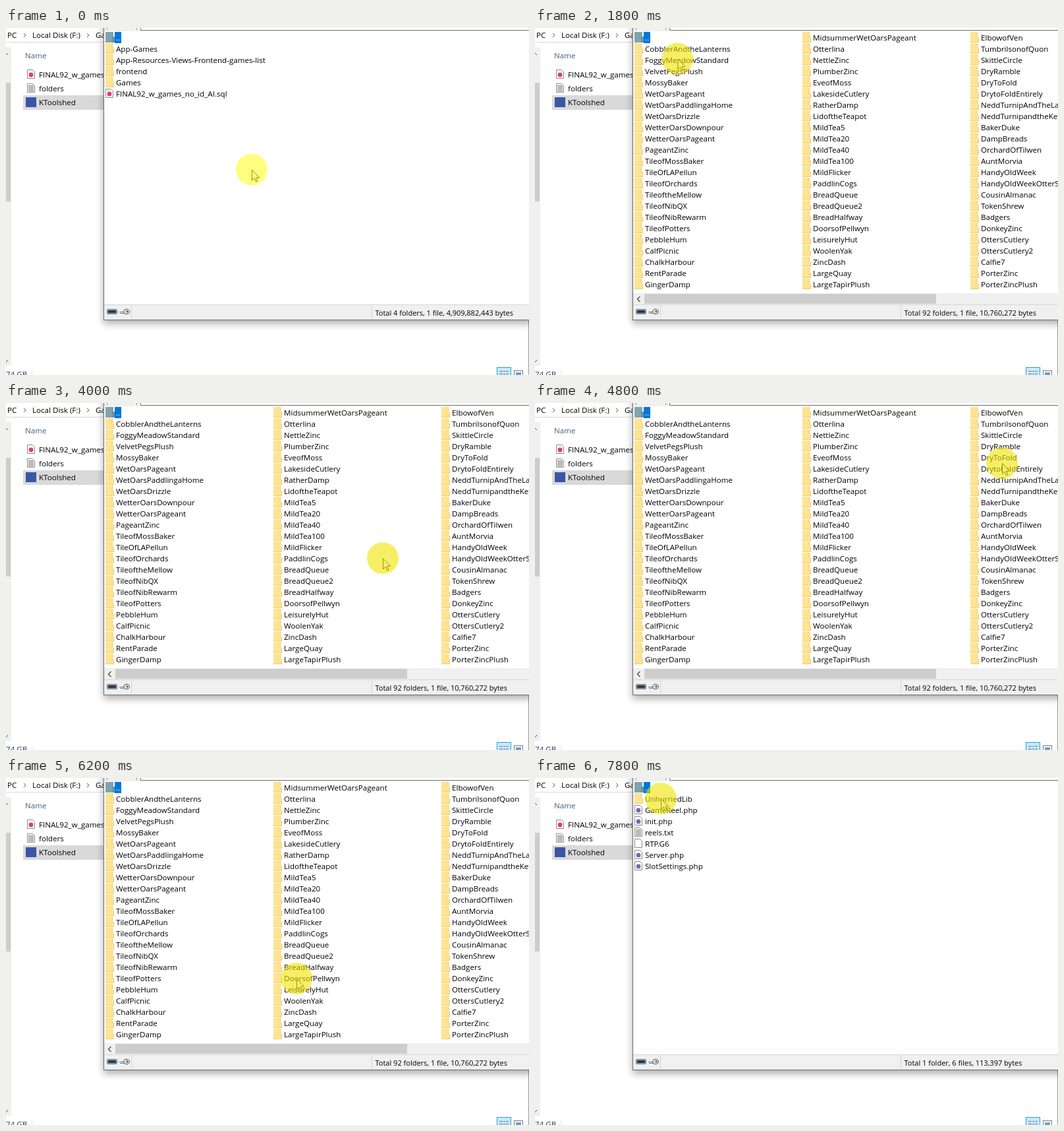
Recreate the animation shown at these times as an HTML page. Size 794 by 526 pixels, loop 8000 ms.

```html
<!DOCTYPE html>
<html lang="en">
<head>
<meta charset="utf-8">
<title>Archive browsing</title>
<style>
  html, body { margin: 0; width: 100%; height: 100%; overflow: hidden; background: #fff; }
  svg { display: block; width: 794px; height: 526px; }
  text { font: 11.6px "Open Sans", "Noto Sans", sans-serif; fill: #000; white-space: pre; }
  .status { font-size: 11px; }
  .line { fill: none; stroke: #555; }
  .panel { filter: drop-shadow(0 5px 6px #0005); }
</style>
</head>
<body>
<svg viewBox="0 0 794 526">
  <g id="explorer"></g>
  <g id="archive"></g>
  <g id="list"></g>
  <g id="pointer">
    <path d="M.5 .5V16.5L4.2 13L6.6 18.6L9 17.6L6.6 12.2H11.6Z" fill="#fff" stroke="#222"/>
    <circle id="halo" r="24"/>
    <g id="rings" fill="none" stroke="#f4ea3c" opacity=".85">
      <circle r="33.5" stroke-width="3"/>
      <circle r="27.5" stroke-width="2.5"/>
    </g>
  </g>
</svg>
<script>
const $ = id => document.getElementById(id);
const words = s => s.trim().split(/\s+/);

const rect = (x, y, w, h, fill, extra = '') =>
  `<rect x="${x}" y="${y}" width="${w}" height="${h}" fill="${fill}" ${extra}/>`;
const text = (x, y, s, extra = '') => `<text x="${x}" y="${y}" ${extra}>${s}</text>`;
const line = (d, extra = '') => `<path class="line" d="${d}" ${extra}/>`;
const dot = (x, y, r, fill) => `<circle cx="${x}" cy="${y}" r="${r}" fill="${fill}"/>`;

const page = (x, y) =>
  `<path d="M${x + .5} ${y + .5}h8l3 3v10h-11z" fill="#fff" stroke="#8a8a8a"/>`;
const lined = (x, y) => page(x, y) +
  line([4, 6, 8, 10, 12].map(d => `M${x + 2} ${y + d - .5}h8`).join(''), 'style="stroke:#777"');
const folder = (x, y, on) => on
  ? rect(x, y - 1, 12, 16, '#7fa3ad') + rect(x + 10, y + 6, 4, 9, '#6594ac')
  : rect(x, y - 1, 11, 16, '#ffe391') + rect(x + 10, y + 7, 3, 8, '#ffe391') +
    line(`M${x} ${y + 14.5}h13M${x + 10.5} ${y - 1}v8M${x + 12.5} ${y + 7}v8`, 'style="stroke:#ecca72"');

function icon(name, x, y, on) {
  const ext = (name.match(/\w\.(\w+)$/) || [])[1];
  if (!ext) return folder(x, y, on);
  if (ext === 'txt') return lined(x, y);
  const mark = { sql: '#e23e5c', php: '#8064ae' }[ext];
  return page(x, y) + (mark ? dot(x + 6, y + 8, 3.4, mark) : '');
}

const screens = [
  {
    items: words('.. App-Games App-Resources-Views-Frontend-games-list frontend Games FINAL92_w_games_no_id_AI.sql'),
    total: 'Total 4 folders, 1 file, 4,909,882,443 bytes'
  },
  {
    items: words(`..
      CobblerAndtheLanterns FoggyMeadowStandard VelvetPegsPlush MossyBaker WetOarsPageant
      WetOarsPaddlingaHome WetOarsDrizzle WetterOarsDownpour WetterOarsPageant PageantZinc
      TileofMossBaker TileOfLAPellun TileofOrchards TileoftheMellow TileofNibQX TileofNibRewarm
      TileofPotters PebbleHum CalfPicnic ChalkHarbour RentParade GingerDamp
      MidsummerWetOarsPageant Otterlina NettleZinc PlumberZinc EveofMoss LakesideCutlery
      RatherDamp LidoftheTeapot MildTea5 MildTea20 MildTea40 MildTea100 MildFlicker PaddlinCogs
      BreadQueue BreadQueue2 BreadHalfway DoorsofPellwyn LeisurelyHut WoolenYak ZincDash
      LargeQuay LargeTapirPlush
      ElbowofVen TumbrilsonofQuon SkittleCircle DryRamble DryToFold DrytoFoldEntirely
      NeddTurnipAndTheLadder NeddTurnipandtheKettle BakerDuke DampBreads OrchardOfTilwen
      AuntMorvia HandyOldWeek HandyOldWeekOtterShelf CousinAlmanac TokenShrew Badgers
      DonkeyZinc OttersCutlery OttersCutlery2 Calfie7 PorterZinc PorterZincPlush`),
    total: 'Total 92 folders, 1 file, 10,760,272 bytes',
    scroll: true
  },
  {
    items: words('.. UnhurriedLib GameReel.php init.php reels.txt RTP.G6 Server.php SlotSettings.php'),
    total: 'Total 1 folder, 6 files, 113,397 bytes'
  }
];

function drawList({ items, total, scroll }, chosen, width) {
  let out = items.map((name, i) => {
    const x = 151 + 255 * Math.floor(i / 23), y = 17 * (i % 23), on = i === chosen;
    return (on ? rect(x + 14, y + 6, width, 17, '#0078d7') : '') +
      icon(name, x, y + 7, on) +
      text(x + 16, y + 19, name, on ? 'style="fill:#fff"' : '');
  }).join('');
  if (scroll) out += rect(149, 402, 645, 17, '#f0f0f0') + rect(166, 403, 443, 15, '#cdcdcd') +
    line('M159.5 407l-4 4l4 4', 'stroke-width="1.5"');
  return out + text(560.5, 436, total, 'class="status"');
}

$('explorer').innerHTML =
  text(2, 15, 'PC') + text(40, 15, 'Local Disk (F:)') + text(136, 15, 'Games') +
  line('M27 8l3 3l-3 3M123 8l3 3l-3 3') +
  rect(0, 21, 149, 1, '#d9d9d9') +
  rect(0, 29, 8, 483, '#f0f0f0') + rect(0, 83, 7, 180, '#cdcdcd') +
  line('M-2 41l2-3l3 3M-2 503l2 4l3-4') +
  text(29, 46, 'Name', 'style="fill:#46607f"') +
  rect(26, 102, 123, 22, '#d9d9d9') +
  page(32, 63) + dot(38, 71, 3.4, '#e23e5c') + lined(32, 84) +
  rect(30, 105, 16, 15, '#3b56a8') +
  text(50, 75, 'FINAL92_w_games') + text(50, 96, 'folders') + text(50, 117, 'KToolshed') +
  text(0, 529, '74 GB', 'style="fill:#1e395b"') + rect(39, 519, 1, 7, '#e2e2e2') +
  rect(793, 443, 1, 83, '#999') +
  rect(745.5, 514.5, 21, 14, '#cce8ff', 'stroke="#26a0da"') +
  line('M749 520.5h5m1 0h3m1 0h4M749 524.5h5m1 0h3m1 0h4', 'style="stroke:#607d96"') +
  rect(771.5, 519.5, 13, 9, '#fff', 'stroke="#777"') + rect(774, 522, 8, 4, '#6aa0cc');

$('archive').innerHTML =
  rect(148, -20, 680, 463, '#6c6c6c', 'class="panel"') +
  rect(149, 0, 645, 442, '#f0f0f0') +
  rect(204, 0, 590, 3, '#fff') + line('M204.5 0V3.5H794', 'style="stroke:#777"') +
  line('M153.5 0v4M198.5 0v4', 'stroke-dasharray="1 1"') +
  rect(149, 5, 645, 414, '#fff') +
  rect(149, 419, 645, 1, '#d7d7d7') +
  rect(190, 421, 1, 20, '#d4d4d4') + rect(555, 421, 1, 20, '#d4d4d4') +
  rect(153.5, 426.5, 15, 7, '#9eb6c8', 'rx="1" stroke="#607480"') + rect(155, 428, 12, 4, '#273746') +
  line('M172 430.5h9M173 432.5h7', 'style="stroke:#777"') +
  `<ellipse cx="183" cy="430" rx="4.5" ry="3.8" fill="#ddd" stroke="#555"/>` + dot(184, 430, 1.4, '#555');

// time, x, y
const path = [
  [0, 373, 214.5], [1200, 209, 36], [1400, 209, 36], [2000, 219, 50], [3200, 219, 50],
  [3600, 235, 250], [4200, 690, 230], [4800, 709, 91], [5200, 715, 150],
  [6200, 441, 304], [6800, 441, 304], [7800, 191, 31], [8000, 191, 31]
];

function place(t) {
  const i = path.findIndex(p => p[0] > t);
  const [t0, x0, y0] = path[i - 1], [t1, x1, y1] = path[i];
  const u = (t - t0) / (t1 - t0), k = u * u * (3 - 2 * u);
  return [x0 + (x1 - x0) * k, y0 + (y1 - y0) * k];
}

let shown = '';
function draw(now) {
  const t = Math.floor(now % 8000 / 200) * 200;
  const screen = t < 1600 ? 0 : t < 6600 ? 1 : 2;
  const first = t >= 1200 && t < 1600, second = t === 6400;
  const [chosen, width] = first ? [1, 67] : second ? [40, 92] : [0, 10];
  const state = screen + '/' + chosen;
  if (state !== shown) {
    shown = state;
    $('list').innerHTML = drawList(screens[screen], chosen, width);
  }
  const [x, y] = place(t);
  $('pointer').setAttribute('transform', `translate(${x.toFixed(1)} ${y.toFixed(1)})`);
  // the halo is deeper while it covers list rows
  const overRows = y - 24 < 6 + 17 * screens[screen].items.length;
  $('halo').setAttribute('fill', overRows ? 'rgba(240,228,0,.6)' : 'rgba(255,255,0,.5)');
  $('rings').style.display = first || second ? '' : 'none';
}

const start = performance.now();
function loop() {
  draw(performance.now() - start);
  requestAnimationFrame(loop);
}
loop();
</script>
</body>
</html>
```
